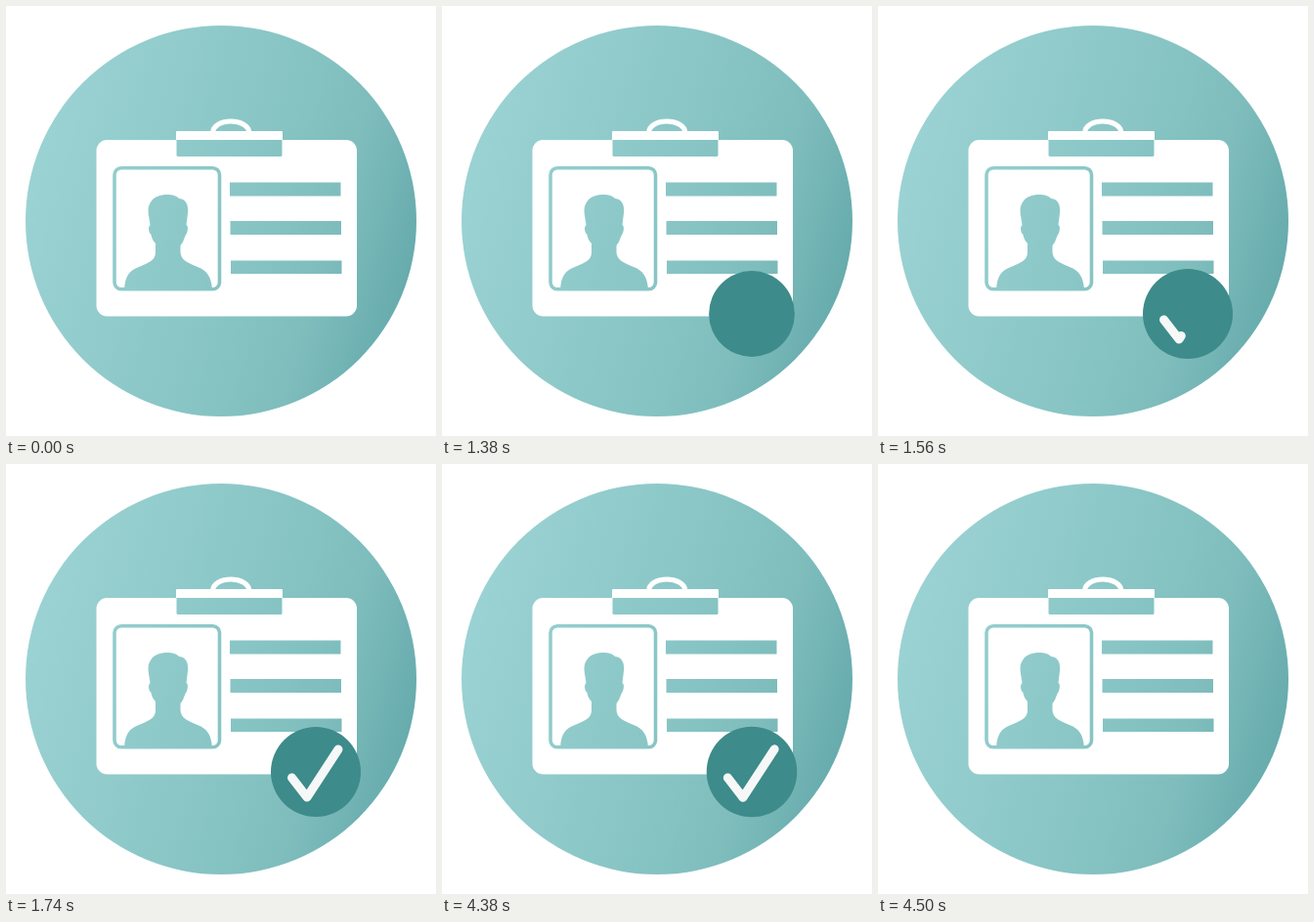
Write an HTML page that moves like this. It is 440x440 px and loops after 5.4 s.

```html
<!DOCTYPE html>
<html lang="en">
<head>
<meta charset="utf-8">
<title>ID card check</title>
<style>
  html, body { margin: 0; width: 100%; height: 100%; overflow: hidden; background: #fff; }
  svg { display: block; width: 100%; height: 100%; }
</style>
</head>
<body>
<svg viewBox="0 0 440 440">
  <defs>
    <linearGradient id="teal" gradientUnits="userSpaceOnUse" x1="26" y1="165" x2="414" y2="275">
      <stop offset="0" stop-color="#9bd2d3"/>
      <stop offset=".5" stop-color="#8ac6c6"/>
      <stop offset=".78" stop-color="#7fbdbd"/>
      <stop offset="1" stop-color="#67abad"/>
    </linearGradient>
  </defs>

  <circle cx="220" cy="220" r="200" fill="url(#teal)"/>

  <!-- card and clip -->
  <g fill="#fff">
    <rect x="92.5" y="137" width="266.5" height="180.5" rx="11"/>
    <rect x="174" y="128" width="109" height="11" rx="1"/>
    <path d="M211.5 130C212 114 248 114 249 130" fill="none" stroke="#fff" stroke-width="5"/>
  </g>

  <!-- openings that show the backdrop -->
  <g fill="url(#teal)">
    <path d="M174.500 137H282.500V152.500Q282.500 154 281 154H176Q174.500 154 174.500 152.500Z"/>
    <rect x="229" y="180.500" width="113.500" height="14"/>
    <rect x="229.500" y="220" width="113.500" height="14"/>
    <rect x="230" y="260.500" width="113.500" height="13.500"/>
    <rect x="111" y="165.700" width="107.500" height="124" rx="7" fill="none" stroke="url(#teal)" stroke-width="3.600"/>
    <path d="M121 290C122 276 126 271 136 267C146 263 153 260 153 252V243C150 240 149 237 148.500 234
      C146 232 145 226 147.500 224C146 212 143 206 150 198C156 192 172 191 177 197C185 197 187 206 186 212
      L184.500 224C187 225 186 232 183.500 235C182 239 181 242 178.500 245V252C179 260 186 263 196 267
      C206 271 210 277 211 290Z"/>
  </g>

  <g id="badge">
    <circle r="46" fill="#3d8b8a"/>
    <path id="tick" d="M-24.500 6L-9 26L23 -23" pathLength="100" fill="none" stroke="#f6f8f8"
      stroke-width="9" stroke-linecap="round" stroke-linejoin="round"/>
  </g>
</svg>
<script>
  const LOOP = 5400, STEP = 30, OVERSHOOT = 1.08;
  const badge = document.getElementById('badge');
  const tick = document.getElementById('tick');

  const progress = (time, start, duration) => Math.min(1, Math.max(0, (time - start) / duration));
  const backIn = u => (OVERSHOOT + 1) * u ** 3 - OVERSHOOT * u ** 2;
  const smooth = u => u * u * (3 - 2 * u);

  function draw(time) {
    const opening = 1 - backIn(1 - progress(time, 1276, 250));
    const closing = 1 - backIn(progress(time, 4285, 187));
    const scale = time < 2000 ? opening : closing;
    badge.style.display = scale > 0.001 ? '' : 'none';
    badge.setAttribute('transform', `translate(317 315) scale(${scale})`);

    const drawn = smooth(progress(time, 1440, 300));
    tick.style.display = drawn > 0 ? '' : 'none';
    tick.setAttribute('stroke-dasharray', drawn < 1 ? `${drawn * 100} 200` : 'none');
  }

  const origin = performance.now();
  function frame() {
    const elapsed = (performance.now() - origin) % LOOP;
    draw(Math.floor(elapsed / STEP) * STEP);
    requestAnimationFrame(frame);
  }
  frame();
</script>
</body>
</html>
```
